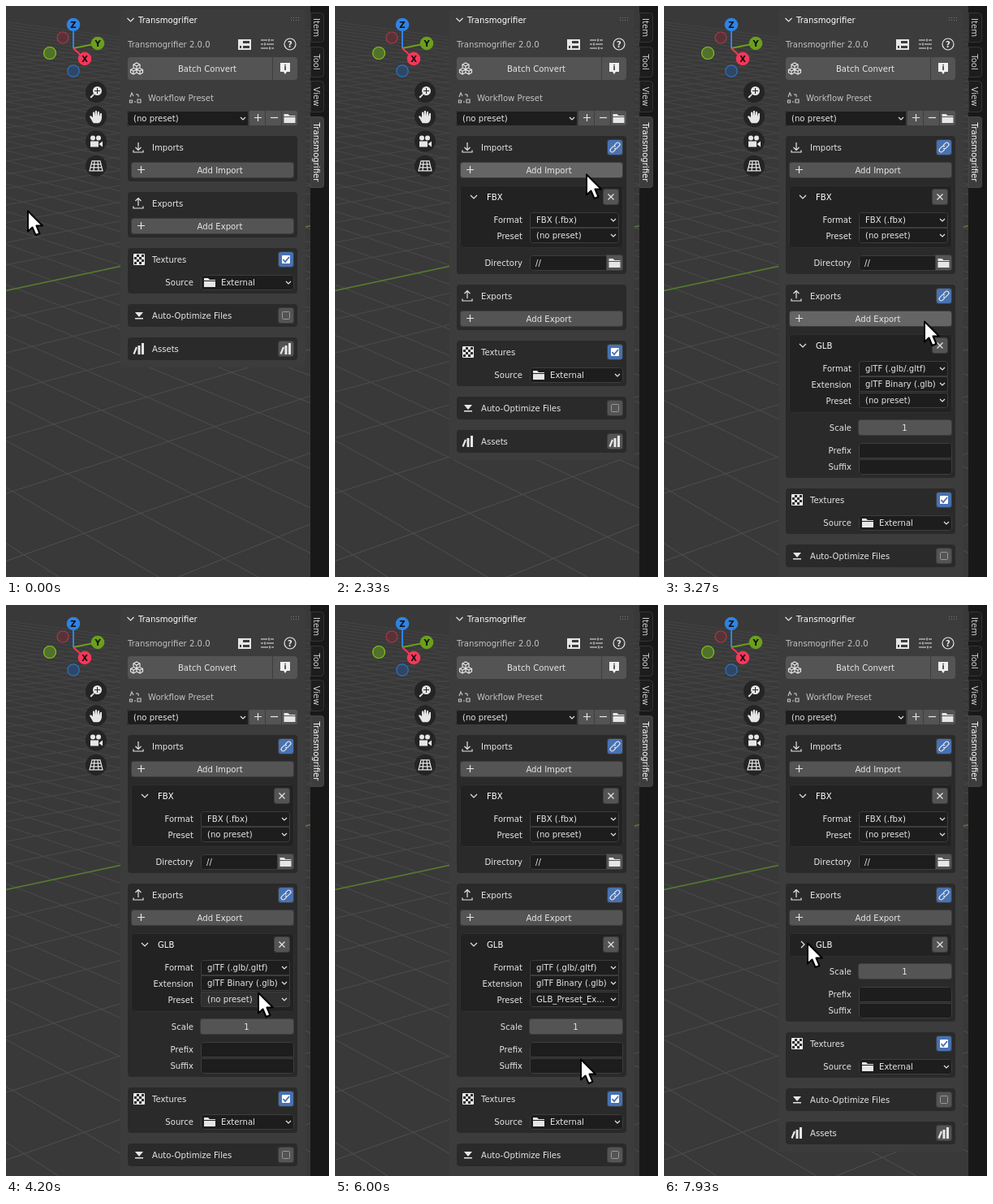
These frames come from a looping animation (398 by 703 pixels, 8 s). An HTML page with a canvas:

```html
<!DOCTYPE html>
<html lang="en">
<head>
<meta charset="utf-8">
<title>Add-on panel walkthrough</title>
<style>
html, body { margin: 0; width: 100%; height: 100%; overflow: hidden; background: #393939; }
canvas { display: block; }
</style>
</head>
<body>
<canvas id="stage" width="398" height="703"></canvas>
<script>
const ctx = document.getElementById('stage').getContext('2d');
const LOOP = 8000, STEP = 1000 / 15;
const TEXT = '#e6e6e6', DIM = '#c2c2c2', BUTTON = '#545454', HOVER = '#656565';
const FIELD = '#1d1d1d', OUTLINE = '#3d3d3d', BLUE = '#4772b3', OPEN_BLUE = '#3c5a94';

// Pointer moves in ticks of 1/15 s: [last still tick, tick count, from, control, to]
const MOVES = [
  [11, 11, [26, 251], [168, 206], [309, 206]],
  [34, 11, [309, 206], [365, 296], [320, 387]],
  [58, 7, [320, 387], [316, 440], [309, 483]],
  [74, 10, [309, 483], [308, 520], [302, 558]],
  [96, 13, [302, 558], [230, 490], [176, 419]],
  [118, 1, [176, 419], [176, 417], [176, 415]]
];

const ICONS = {
  import: 'M0-6V3M-3.5 0L0 3.5L3.5 0M-6 3.5V6H6V3.5',
  export: 'M0 3V-6.5M-3.5-3L0-6.5L3.5-3M-6 3.5V6H6V3.5',
  down: 'M-4-2L0 2L4-2',
  right: 'M-2-4L2 0L-2 4',
  small: 'M-3-1.5L0 1.5L3-1.5',
  plus: 'M-4.5 0H4.5M0-4.5V4.5',
  minus: 'M-4.5 0H4.5',
  cross: 'M-3.5-3.5L3.5 3.5M3.5-3.5L-3.5 3.5',
  check: 'M-3.5 0L-1 3L4-3',
  table: 'M-8-6H8V7H-8ZM-2-4V-1H6V-4ZM-2 2V5H6V2ZM-6 2V5H-4V2Z',
  sliders: 'M-8-5H0M4-5H8M-8 0H-5M-1 0H8M-8 5H1M5 5H8M2-6.5V-3.5M-3-1.5V1.5M3 3.5V6.5',
  link: 'M-.9-2.5L1.8-5.2A2.4 2.4 0 0 1 5.2-1.8L2.5 .9A2.4 2.4 0 0 1-.9 .9' +
    'M.9 2.5L-1.8 5.2A2.4 2.4 0 0 1-5.2 1.8L-2.5-.9A2.4 2.4 0 0 1 .9-.9',
  folder: 'M-7-5H-2L0-3H7V-2H-7ZM-7-1H7V6H-7Z',
  books: 'M-7.5 6L-4-2.5L-2-1.5L-5.5 7ZM-1.5-4H1.5V7H-1.5ZM3-7H6V7H3Z',
  optimize: 'M-5-4H5L0 2ZM-5 3H5V4.5H-5Z',
  cubes: 'M0-7L4-5V-1L0 1L-4-1V-5ZM-4-5L0-3L4-5M0-3V1M-4 0L-7.5 1.5V5L-4 7L0 5V1.5' +
    'M4 0L7.5 1.5V5L4 7L0 5M-7.5 1.5L-4 3L0 1.5L4 3L7.5 1.5M-4 3V7M4 3V7',
  bubble: 'M-6-7H6V4H2L0 7L-2 4H-6Z',
  magnifier: 'M-4-1.5A5.5 5.5 0 1 1 7-1.5A5.5 5.5 0 1 1-4-1.5M1-5V-2H-2V-1H1V2H2V-1H5V-2H2V-5Z' +
    'M-3 2L-7.5 6L-6 7.5L-2 3Z',
  hand: 'M-4 7L-8 0Q-7-2-5 0L-4 1V-5Q-3-7-2-5V-1L-1-7Q0-8 1-7V-1L2-6Q3-7 4-6V0L5-4Q6-5 7-4V2Q6 7 3 8H-3Z',
  camera: 'M-7 0H3V7H-7ZM4 3L8 0V7L4 4ZM-1-4A3 3 0 1 1-7-4A3 3 0 1 1-1-4M6-4A3 3 0 1 1 0-4A3 3 0 1 1 6-4',
  floor: 'M-5-6H5L8 6H-8ZM-6-2H6M-7 2H7M-2-6L-3 6M2-6L3 6',
  workflow: 'M-6.5 3H-3.5V6H-6.5ZM-6-1L-4-6L-2-2M1-4Q5-5 4-1M3 2H7V6H3ZM-1 5H1'
};

let pointer, pointerActive, fieldsActive;

const over = (x, y, w, h) =>
  pointerActive && pointer[0] >= x && pointer[0] < x + w && pointer[1] >= y && pointer[1] < y + h;

function box(x, y, w, h, fill, radius = 3, border) {
  ctx.beginPath();
  ctx.roundRect(x, y, w, h, radius);
  ctx.fillStyle = fill;
  ctx.fill();
  if (!border) return;
  ctx.beginPath();
  ctx.roundRect(x + .5, y + .5, w - 1, h - 1, radius);
  ctx.strokeStyle = border;
  ctx.lineWidth = 1;
  ctx.stroke();
}

function text(label, x, y, align = 'left', color = TEXT, font = '10.1px') {
  ctx.font = font + ' "DejaVu Sans", sans-serif';
  ctx.textAlign = align;
  ctx.fillStyle = color;
  ctx.fillText(label, x, Math.round(y + 3.6));
}

function icon(name, x, y, filled = false, color = TEXT, width = 1.2) {
  const path = new Path2D(ICONS[name]);
  ctx.save();
  ctx.translate(x, y);
  ctx.fillStyle = ctx.strokeStyle = color;
  ctx.lineWidth = width;
  filled ? ctx.fill(path) : ctx.stroke(path);
  ctx.restore();
}

function line(x1, y1, x2, y2, color, width = 1) {
  ctx.beginPath();
  ctx.moveTo(x1, y1);
  ctx.lineTo(x2, y2);
  ctx.strokeStyle = color;
  ctx.lineWidth = width;
  ctx.stroke();
}

function disc(x, y, r, fill, border) {
  ctx.beginPath();
  ctx.arc(x, y, r, 0, 7);
  ctx.fillStyle = fill;
  ctx.fill();
  if (!border) return;
  ctx.strokeStyle = border;
  ctx.lineWidth = 1.2;
  ctx.stroke();
}

function button(x, y, w, h, radius = 3, color = BUTTON) {
  box(x - 1, y - 1, w + 2, h + 2, OUTLINE, radius);
  box(x, y, w, h, color === BUTTON && over(x, y, w, h) ? HOVER : color, radius);
}

function dropdown(label, x, cy, w, radius = 3, open = false) {
  const hot = fieldsActive && over(x, cy - 9.5, w, 19);
  box(x, cy - 9.5, w, 19, open ? OPEN_BLUE : hot ? '#303030' : FIELD, radius, open ? OPEN_BLUE : OUTLINE);
  text(label, x + 8, cy);
  icon('small', x + w - 7, cy);
}

const label = (s, cy) => text(s, 231, cy, 'right');
const group = (y, h) => box(150, y, 209, h, '#2a2a2a', 4);

function textField(cy, w, radius, value = '') {
  box(240, cy - 9.5, w, 19, FIELD, radius, OUTLINE);
  text(value, 247, cy);
}

function addButton(name, cy, pressed) {
  button(155, cy - 9, 199, 18, 3, pressed ? BLUE : BUTTON);
  icon('plus', 166.5, cy - .5);
  text(name, 263.5, cy, 'center');
}

function linkButton(cy) {
  button(336, cy - 9, 18, 18, 3, BLUE);
  icon('link', 345, cy);
}

function itemHeader(name, cy, height, open) {
  box(154, cy - 14, 201, height, '#222', 4, '#303030');
  icon(open ? 'down' : 'right', 171, cy);
  text(name, 187, cy, 'left', '#fff');
  button(331, cy - 9, 18, 18);
  icon('cross', 340, cy);
}

function viewport() {
  ctx.fillStyle = '#393939';
  ctx.fillRect(0, 0, 398, 703);
  ctx.save();
  ctx.beginPath();
  ctx.rect(0, 0, 375, 703);
  ctx.clip();
  const fade = ctx.createLinearGradient(0, 0, 0, 703);
  fade.addColorStop(0, '#424242');
  fade.addColorStop(.4, '#494949');
  fade.addColorStop(1, '#4f4f4f');
  // Both families of floor lines meet the bottom edge at even spacing.
  for (let k = -3; k < 45; k++) line(-1268, -150, 65 + (k - 3) * 123, 703, fade);
  for (let k = -20; k < 16; k++) line(2347, -150, -1657 + k * 267, 703, fade);
  line(0, 350.5, 375, 270.7, '#557d2b', 1.4);
  ctx.restore();
}

function gizmo() {
  disc(70, 39, 7, '#593238', '#a83a4b');
  disc(83, 80, 7.2, '#2f4766', '#2e74c4');
  disc(54, 58, 7.5, '#51722a', '#86c31c');
  const axes = [['Z', 83, 23, '#2f83e3'], ['Y', 113, 46, '#6b9f1d'], ['X', 97, 65, '#f8365a']];
  for (const [name, x, y, color] of axes) {
    line(83, 52, x, y, color, 2);
    disc(x, y, 8.3, color);
    text(name, x, y, 'center', '#101010', 'bold 10px');
  }
  ['magnifier', 'hand', 'camera', 'floor'].forEach((name, i) => {
    const y = 106 + i * 30.3;
    disc(111, y, 13, '#242424');
    icon(name, 111, y, name !== 'floor');
  });
}

function sideTabs() {
  ctx.fillStyle = '#181818';
  ctx.fillRect(375, 0, 23, 703);
  for (const [name, y, h] of [['Item', 8, 37], ['Tool', 50, 38], ['View', 92, 39], ['Transmogrifier', 136, 88]]) {
    const active = h > 80;
    box(375, y, 17, h, active ? '#3d3d3d' : '#1d1d1d', [0, 4, 4, 0], active ? '#464646' : '#353535');
    ctx.save();
    ctx.translate(383, y + h / 2);
    ctx.rotate(Math.PI / 2);
    text(name, 0, 0, 'center', active ? '#fff' : '#d0d0d0');
    ctx.restore();
  }
}

function panelTop() {
  icon('down', 153.5, 17);
  text('Transmogrifier', 163, 17, 'left', '#fff');
  ctx.fillStyle = '#777';
  for (let i = 0; i < 8; i++) ctx.fillRect(351 + (i % 4) * 3, i < 4 ? 14 : 17, 1, 1);

  text('Transmogrifier 2.0.0', 150, 47, 'left', DIM);
  icon('table', 294, 47, true);
  icon('sliders', 322, 47);
  disc(350, 47, 7, '#3c3c3c', TEXT);
  text('?', 350, 47, 'center', TEXT, 'bold 10px');

  button(150, 63, 178, 28, [4, 0, 0, 4]);
  button(329, 63, 30, 28, [0, 4, 4, 0]);
  icon('cubes', 161, 77);
  text('Batch Convert', 248, 77, 'center');
  icon('bubble', 344, 77, true, '#f0f0f0');
  text('i', 344, 75.5, 'center', '#333', 'bold 9px');

  icon('workflow', 159, 113, false, DIM);
  text('Workflow Preset', 175, 113, 'left', DIM);
  dropdown('(no preset)', 149, 138.5, 150, [3, 0, 0, 3]);
  button(300, 129, 19, 18, 0);
  button(320, 129, 19, 18, 0);
  button(340, 129, 19, 18, [0, 3, 3, 0]);
  icon('plus', 310.5, 137.5);
  icon('minus', 330.5, 137.5);
  icon('folder', 349.5, 138, true);
}

function imports(open, pressed) {
  group(160, open ? 170 : 56);
  icon('import', 163, 174);
  text('Imports', 180, 174);
  addButton('Add Import', 202, pressed);
  if (!open) return;
  linkButton(174);
  itemHeader('FBX', 235, 77, true);
  label('Format', 263);
  dropdown('FBX (.fbx)', 240, 263.5, 110, [3, 3, 0, 0]);
  label('Preset', 283);
  dropdown('(no preset)', 240, 282.5, 110, [0, 0, 3, 3]);
  label('Directory', 316);
  textField(316.5, 95, [3, 0, 0, 3], '//');
  button(335, 307, 19, 18, [0, 3, 3, 0]);
  icon('folder', 344.5, 316, true);
}

function exports(y, open, collapsed, pressed, preset, menuOpen) {
  const cut = collapsed ? 68 : 0;
  group(y - 14, open ? 238 - cut : 56);
  icon('export', 163, y);
  text('Exports', 180, y);
  addButton('Add Export', y + 28, pressed);
  if (!open) return;
  linkButton(y);
  itemHeader('GLB', y + 61, 97 - cut, !collapsed);
  if (!collapsed) {
    label('Format', y + 89);
    dropdown('glTF (.glb/.gltf)', 240, y + 89.5, 110, [3, 3, 0, 0]);
    label('Extension', y + 109);
    dropdown('glTF Binary (.glb)', 240, y + 108.5, 110, 0);
    label('Preset', y + 129);
    dropdown(preset, 240, y + 128.5, 110, [0, 0, 3, 3], menuOpen);
  }
  y -= cut;
  label('Scale', y + 162);
  button(240, y + 153, 114, 18, 3, '#545455');
  text('1', 296.5, y + 162, 'center');
  label('Prefix', y + 190);
  textField(y + 190.5, 115, [3, 3, 0, 0]);
  label('Suffix', y + 210);
  textField(y + 210.5, 115, [0, 0, 3, 3]);
}

function lowerGroups(y) {
  group(y - 14, 56);
  box(157, y - 7, 14, 14, '#2a2a2a', 0, '#eee');
  ctx.fillStyle = '#eee';
  for (let row = 0; row < 4; row++)
    for (let col = row % 2; col < 4; col += 2) ctx.fillRect(158 + col * 3, y - 6 + row * 3, 3, 3);
  text('Textures', 180, y);
  button(336, y - 9, 18, 18, 3, BLUE);
  box(340, y - 5, 10, 10, '#fff', 1);
  icon('check', 345, y, false, BLUE, 1.8);
  label('Source', y + 28);
  dropdown('', 240, y + 28.5, 115);
  icon('folder', 251, y + 28, true);
  text('External', 265, y + 28);

  group(y + 55, 28);
  icon('optimize', 164, y + 69, true);
  text('Auto-Optimize Files', 180, y + 69);
  button(336, y + 60, 18, 18);
  box(340, y + 64, 10, 10, BUTTON, 1, '#999');

  group(y + 96, 28);
  icon('books', 164, y + 110, true);
  text('Assets', 180, y + 110);
  button(336, y + 101, 18, 18);
  icon('books', 345, y + 110, true);
}

function presetMenu() {
  box(240, 495, 162, 103, '#181818', [0, 0, 4, 4], '#262626');
  const items = [['(no preset)', 1], ['GLB_Draco_Preset_Example', 0], ['GLB_Preset_Example', 1]];
  items.forEach(([name, key], i) => {
    const y = 509 + i * 22;
    if (Math.abs(pointer[1] - y) < 11) box(243, y - 11, 155, 22, BLUE, 3);
    text(name, 250, y);
    const start = ctx.measureText(name.slice(0, key)).width;
    ctx.fillRect(250 + start, y + 6, ctx.measureText(name[key]).width, 1);
  });
  line(243, 568.5, 398, 568.5, '#2c2c2c');
  text('Preset', 248, 582, 'left', '#8c8c8c');
}

function pointerAt(tick) {
  let place = MOVES[0][2];
  for (const [start, count, from, control, to] of MOVES) {
    if (tick <= start) break;
    const p = Math.min(1, (tick - start) / count);
    const e = p < .5 ? .5 * (2 * p) ** 3.2 : 1 - .5 * (2 - 2 * p) ** 3.2;
    place = from.map((a, i) => (1 - e) ** 2 * a + 2 * e * (1 - e) * control[i] + e * e * to[i]);
  }
  return place.map(Math.round);
}

function drawPointer() {
  ctx.save();
  ctx.translate(...pointer);
  const arrow = new Path2D('M1 1.5V26.5L6.5 21.5L10.5 31L15.5 29L11.5 19.5H19Z');
  ctx.lineJoin = 'round';
  ctx.lineWidth = 2;
  ctx.strokeStyle = '#000';
  ctx.fillStyle = '#fff';
  ctx.fill(arrow);
  ctx.stroke(arrow);
  ctx.restore();
}

function draw(now) {
  const tick = Math.floor((now % LOOP + 3.4) / STEP);
  const importOpen = tick >= 28, exportOpen = tick >= 49, collapsed = tick >= 111;
  const menuOpen = tick >= 69 && tick < 90;
  const exportY = importOpen ? 357 : 243;
  const lowerY = exportY + (exportOpen ? (collapsed ? 183 : 251) : 69);
  pointer = pointerAt(tick);
  pointerActive = !menuOpen;
  fieldsActive = tick < 69;

  viewport();
  gizmo();
  box(141, 4, 228, lowerY + 129, '#3c3c3c', 4);
  sideTabs();
  panelTop();
  imports(importOpen, tick === 27);
  exports(exportY, exportOpen, collapsed, tick === 48, tick < 90 ? '(no preset)' : 'GLB_Preset_Ex...', menuOpen);
  lowerGroups(lowerY);
  if (menuOpen) presetMenu();
  drawPointer();
  requestAnimationFrame(draw);
}
draw(performance.now());
</script>
</body>
</html>
```
